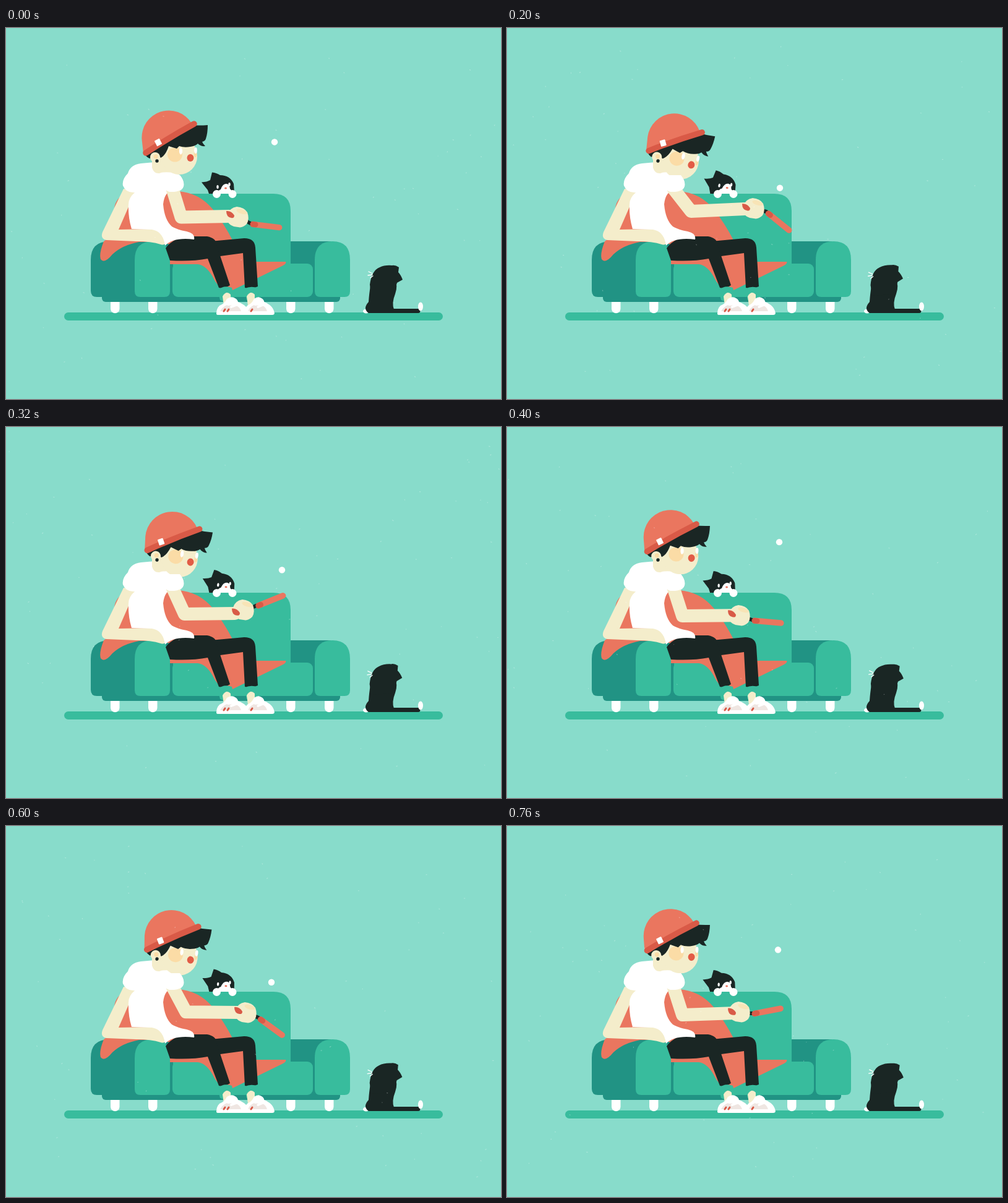
Animation, 800 px wide and 600 px high, one loop 800 ms. Source, as an HTML page:

```html
<!DOCTYPE html>
<html lang="en">
<head>
<meta charset="utf-8">
<title>Sofa paddle ball</title>
<style>
  html, body { margin: 0; width: 100%; height: 100%; overflow: hidden; background: #88dccb; }
  svg { display: block; width: 800px; height: 600px; }
  .mid { fill: #38bc9d; }
  .dark { fill: #219384; }
  .red { fill: #ea765f; }
  .brick { fill: #d95a47; }
  .skin { fill: #f4edcb; }
  .blush { fill: #fbdca6; }
  .ink { fill: #1a2624; }
  .white { fill: #fff; }
  .line { fill: none; stroke-linecap: round; stroke-linejoin: round; }
</style>
</head>
<body>
<svg viewBox="0 0 800 600">
  <defs>
    <g id="shoe">
      <path class="white" d="M0 462Q0 454 5 449Q13 446 17 438Q23 434 28 436Q34 438 35 443Q51 449 53 461Q53 464 49 464H3Q0 464 0 462Z"/>
      <path fill="#efe6e2" d="M6 458Q10 450 20 447Q37 447 40 458Z"/>
      <path class="line" stroke="#fff" stroke-width="4" d="M19 447L28 446M24 451L32 448"/>
    </g>
    <path id="foot" class="white" d="M0 438H14.500V454A7.250 7.250 0 0 1 0 454Z"/>
    <path id="armrest" class="mid" d="M0 375Q0 345 29 345Q57 345 57 375V426Q57 435 48 435H9Q0 435 0 426Z"/>
  </defs>
  <rect width="800" height="600" fill="#88dccb"/>

  <!-- floor and sofa -->
  <rect class="mid" x="94" y="460" width="612" height="13" rx="6.500"/>
  <use href="#foot" x="169"/><use href="#foot" x="230"/>
  <use href="#foot" x="453"/><use href="#foot" x="515"/>
  <rect class="dark" x="155" y="425" width="385" height="18" rx="6"/>
  <path class="dark" d="M137 375Q137 345 167 345H525V435H147Q137 435 137 425Z"/>

  <g id="kitten">
    <path class="ink" d="M330 274L326 262L316 249.500Q325 249 330 246L333 233.500Q340 234 346 238Q362 238 368 252L369 266Q368 274 350 274Z"/>
    <path class="white" d="M339 274Q342 262 347 261Q350 252 356 252Q361 252 362 260Q366 263 366 274Z"/>
    <ellipse class="white" cx="342" cy="257" rx="1.700" ry="3"/>
    <ellipse class="white" cx="361" cy="253" rx="1.700" ry="3"/>
    <ellipse class="red" cx="355" cy="259" rx="2" ry="1.500"/>
  </g>
  <path class="mid" d="M270 268H432Q460 268 460 296V400H270Z"/>
  <circle class="white" cx="340.500" cy="268.500" r="6.500"/>
  <circle class="white" cx="366" cy="268.500" r="6.500"/>
  <rect class="mid" x="269" y="381" width="227" height="54" rx="9"/>

  <!-- blanket -->
  <path class="red" d="M175 292C178 268 200 263 230 262L278 264Q312 266 335 294Q352 316 366 343L398 378H452Q454 381 446 385L366 424Q345 424 336 406Q325 384 310 382H265V350L180 330Z"/>
  <path class="red" d="M190 322L158 345Q150 365 153 374Q159 382 172 366Q188 351 215 346H262V320Z"/>
  <use href="#armrest" x="208"/><use href="#armrest" x="499"/>

  <!-- seated figure -->
  <path class="ink" d="M330 345L385 340Q402 340 403 355L407 418Q397 423 386 420L383 364L346 369Z"/>
  <path class="ink" d="M258 356Q272 337 300 337H325Q340 340 340 350L362 416Q353 422 344 420L326 373Q300 378 265 376Z"/>
  <path class="mid" d="M342 424Q352 415 365 420L370 440Q357 446 346 440Z"/>
  <path class="mid" d="M385 422Q396 416 407 421L410 440Q398 446 389 440Z"/>
  <path class="skin" d="M350 434Q356 424 363 431L364 449H352Z"/>
  <path class="skin" d="M389 434Q395 424 402 431L402 449H391Z"/>
  <use href="#shoe" x="385" transform="translate(31.800) scale(.918 1)"/>
  <use href="#shoe" x="340"/>
  <path class="line" stroke="#d95a47" stroke-width="3" d="M352 458L354 455M358 458L360 455M396 458L398 455"/>
  <path class="skin" d="M190 260L156 330Q152 341 162 343L210 345Q235 345 250 350Q262 353 257 338Q249 325 235 325L182 326L210 262Z"/>
  <path class="white" d="M218 219Q201 221 197 235Q187 245 189 255Q194 267 208 266Q198 275 198 285Q197 305 203 325L236 326Q254 329 257 352Q270 338 304 342Q306 332 292 329Q276 326 268 321Q256 310 254 285Q256 267 266 264Q285 267 287 255Q288 247 281 238L240 217Z"/>
  <path class="skin" d="M236 205V226Q239 236 248 235Q254 232 272 234L270 205Z"/>

  <g id="head">
    <path class="skin" d="M240 208L262 182H305V210H262L245 225Z"/>
    <circle class="skin" cx="280" cy="208" r="29"/>
    <ellipse class="blush" cx="273" cy="205" rx="12" ry="11.500"/>
    <ellipse class="blush" cx="306" cy="204" rx="2.500" ry="5"/>
    <path class="ink" d="M223 200Q225 208 232 211Q240 208 245 203L250 210Q258 206 263 191Q269 193 276 195L280 191Q288 194 298 192Q306 191 310 187Q315 192 322 191Q318 187 317 184Q322 183 323 179Q326 170 326 157Q312 158 300 157Z"/>
    <circle class="skin" cx="241" cy="209" r="8"/>
    <circle class="blush" cx="242" cy="208" r="3.500"/>
    <circle class="ink" cx="244" cy="215" r="2.700"/>
    <ellipse class="white" cx="282.500" cy="199" rx="2.600" ry="5.500"/>
    <ellipse class="white" cx="306.500" cy="198" rx="2.400" ry="5"/>
    <ellipse fill="#e25c46" cx="298" cy="210" rx="5.500" ry="6"/>
    <path class="red" d="M222 203L219.500 180A43.600 43.600 0 0 1 300 154L303 156Z"/>
    <path class="line" stroke="#d95a47" stroke-width="9.500" d="M226 202Q262 178 304 155"/>
    <rect class="white" x="-4.500" y="-5" width="9" height="10" rx="1" transform="translate(246 185) rotate(-28)"/>
  </g>

  <path id="paddle" class="line" stroke="#ea765f" stroke-width="9.500"/>
  <path id="grip" class="line" stroke="#1a2624" stroke-width="6"/>
  <path id="rim" class="line" stroke="#d95a47" stroke-width="9"/>
  <path id="arm" class="line" stroke="#f4edcb" stroke-width="21"/>
  <!-- sleeve over the shoulder joint -->
  <path class="white" d="M252 238H281Q289 248 287 256Q284 266 264 265Q254 262 252 250Z"/>
  <g id="hand">
    <path class="skin" d="M-17 -4Q-14 -15 -2 -17Q10 -16 15 -8Q19 3 14 11Q7 18 0 16Q-15 15 -18 4Z"/>
    <ellipse class="blush" cx="6" cy="-9" rx="9" ry="3.500" transform="rotate(18 6 -9)" opacity=".55"/>
    <path id="thumb" class="brick" d="M-7 -5Q1 -6 6 2Q6 7 1 6Q-7 5 -7 -5Z"/>
  </g>

  <!-- sitting cat -->
  <path class="line" stroke="#1a2624" stroke-width="7" d="M595 457.500H666"/>
  <ellipse class="white" cx="670" cy="450.500" rx="4" ry="7"/>
  <ellipse class="white" cx="582" cy="458" rx="5" ry="3.500"/>
  <path class="ink" d="M586 461Q576 454 586 443Q588 415 593 402L628 408Q634 415 629 430Q623 445 627 455L634 461Z"/>
  <g id="cat">
    <path class="ink" d="M588 415Q591 392 604 387Q612 383 624 384Q629 383 635 387L634 395Q638 399 641 407L632 412L626 432H590Z"/>
    <path class="line" stroke="#fff" stroke-width="1.300" d="M592 397L586 394M592 399L585 400M593 401L589 404"/>
  </g>

  <circle id="ball" class="white" r="5.200"/>
  <path id="specks" class="line" stroke="#fff" stroke-width="1.100" opacity=".3"/>
</svg>
<script>
const LOOP = 800, STEP = 40;
const el = id => document.getElementById(id);

// time, ball x, hand x, hand y, paddle angle, grip offset y, head tilt
const poses = [
  [0, 434, 375, 306, 7, 11, 0],
  [120, 440, 388, 307, 48, 10, 3],
  [160, 441, 394, 302, 47, 9, 7],
  [200, 441, 399, 292, 39, 6, 12],
  [240, 442, 398, 292, 14, 5, 13],
  [280, 444, 391, 291, -14, -4, 12],
  [320, 446, 384, 296, -22, -6, 9],
  [400, 440, 376, 305, 5, 8, 2],
  [520, 432, 379, 305, 42, 13, 1.5],
  [600, 429, 388, 302, 36, 9, 7],
  [640, 428, 389, 297, 8, 4, 11],
  [680, 431, 381, 290, -12, -7, 11],
  [760, 438, 376, 301, -11, 3, 2],
  [LOOP, 434, 375, 306, 7, 11, 0]
];

function poseAt(t) {
  const i = poses.findIndex(p => p[0] > t);
  const a = poses[i - 1], b = poses[i];
  const k = (t - a[0]) / (b[0] - a[0]);
  return a.map((v, j) => v + (b[j] - v) * k);
}

// Free flight between two paddle hits
function ballY(t) {
  const apex = t < 245 ? 42 : t < 645 ? 448 : 842;
  return Math.min(297, 178.8 + 0.0032 * (t - apex) ** 2);
}

function speckPath(seed) {
  let s = seed * 7919 + 17, d = "";
  const rnd = () => (s = (s * 16807) % 2147483647) / 2147483647;
  rnd(); rnd();
  for (let i = 0; i < 60; i++) {
    d += `M${rnd() * 800} ${30 + rnd() * 540}l${rnd() * 3 - 1.5} ${rnd() * 2 - 1}`;
  }
  return d;
}

function draw(t) {
  const [, bx, hx, hy, angle, gy, tilt] = poseAt(t);
  const set = (id, name, value) => el(id).setAttribute(name, value);
  const rad = angle * Math.PI / 180;
  const dx = Math.cos(rad), dy = Math.sin(rad);
  const px = hx + 21, py = hy + gy;
  const seg = (from, to) => `M${px + dx * from} ${py + dy * from}L${px + dx * to} ${py + dy * to}`;
  const reach = hx - 375;
  const elbow = `${283 + reach * 0.6} ${306 - reach * 0.4}`;
  const wrist = `${hx - 14} ${hy + 3 - gy * 0.4}`;

  set("paddle", "d", seg(3, 46));
  set("rim", "d", seg(3, 7));
  set("grip", "d", `M${hx + 12} ${hy + gy * 0.5}L${px - 1} ${py - 1}`);
  set("arm", "d", `M269 260L${elbow}L${wrist}`);
  set("hand", "transform", `translate(${hx} ${hy})`);
  set("thumb", "transform", `translate(-12 ${-gy * 0.45})`);
  set("head", "transform", `rotate(${tilt} 244 215)`);
  set("kitten", "transform", `translate(0 ${-tilt * 0.1}) rotate(${tilt * 0.7} 350 264)`);
  set("cat", "transform", `rotate(${-tilt * 0.25} 608 425)`);
  set("ball", "transform", `translate(${bx} ${ballY(t)})`);
  set("specks", "d", speckPath(t / STEP + 1));
}

let last = -1;
function tick() {
  const t = Math.floor(performance.now() % LOOP / STEP) * STEP;
  if (t !== last) draw(last = t);
  requestAnimationFrame(tick);
}
tick();
</script>
</body>
</html>
```
